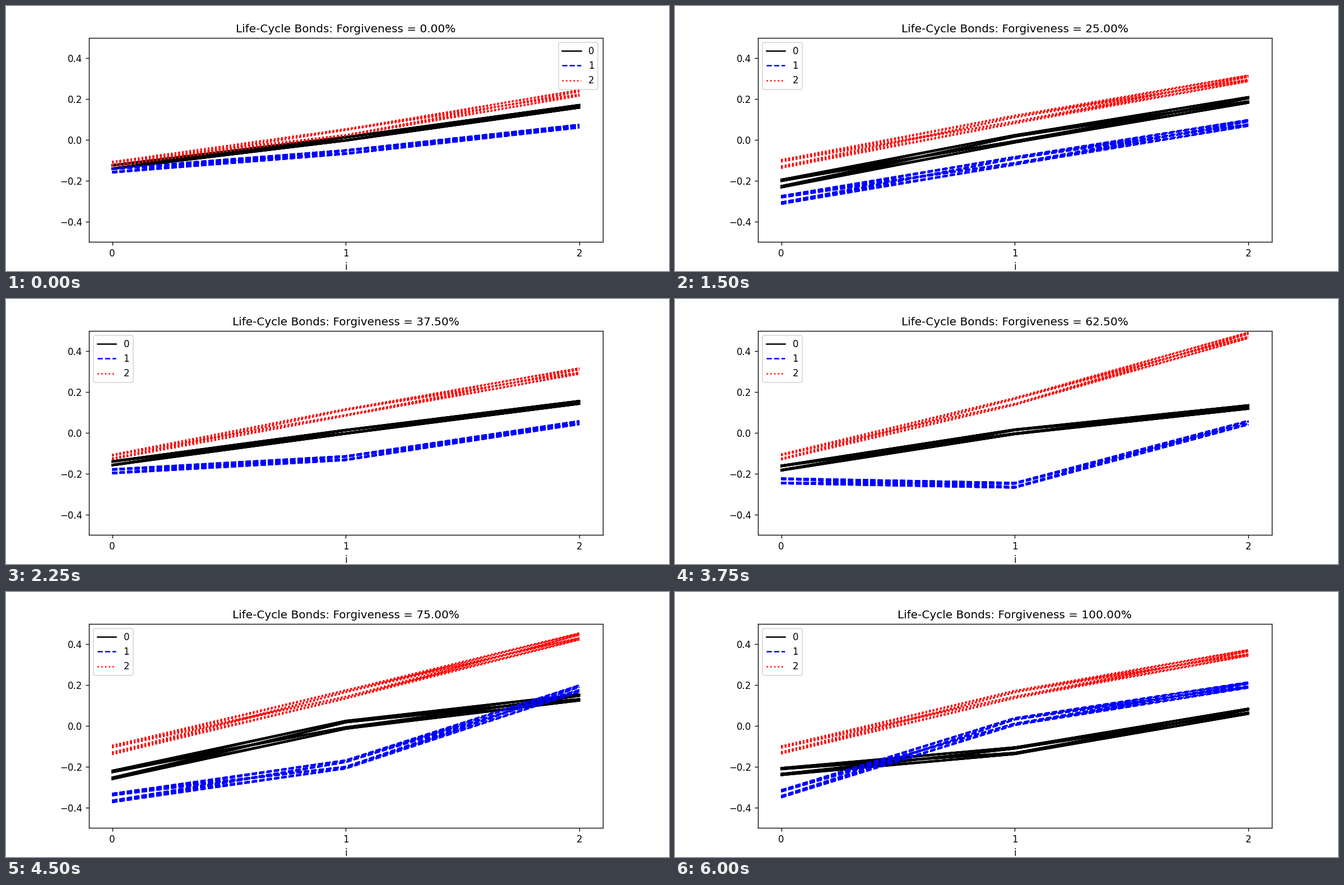
A matplotlib script for the animation above (6.75 s loop, 1183 px wide and 473 px high).

```python
from itertools import product

import numpy as np
import matplotlib.pyplot as plt
from matplotlib.animation import FuncAnimation

STEPS = 9
NODES = [0, 1, 2]
STYLES = ["k-", "b--", "r:"]
CARRY = 0.25  # share of a deviation that survives to the next node
SHOCKS = np.array(list(product((1, -1), repeat=5)))


def track(p, *points):
    """Linear path through (forgiveness, value) key points."""
    return np.interp(p, *zip(*points))


def volatility(p):
    return track(p, (0, 0.52), (0.125, 1.03), (0.25, 0.98), (0.375, 0.55),
                 (0.625, 0.65), (0.75, 1.05), (1, 0.9))


def black_center(p, vol):
    return (-0.05 - 0.16 * vol - 0.03 * p,
            track(p, (0.75, 0.005), (1, -0.122)),
            0.12 + 0.085 * vol - 0.125 * p ** 2)


def blue_center(p, vol):
    return (-0.01 - 0.27 * vol - 0.08 * p,
            track(p, (0, -0.06), (0.375, -0.124), (0.625, -0.257),
                  (0.75, -0.189), (1, 0.021)),
            track(p, (0, 0.067), (0.125, 0.116), (0.375, 0.05),
                  (0.625, 0.05), (0.75, 0.183), (1, 0.2)))


def red_center(p, vol):
    return (-0.118,
            track(p, (0, 0.036), (0.125, 0.1), (0.375, 0.1), (0.625, 0.154)),
            track(p, (0, 0.23), (0.125, 0.3), (0.375, 0.303),
                  (0.625, 0.478), (1, 0.358)))


def bundle(center, vol, late_vol):
    """All paths around a centre, one per history of up and down shocks."""
    sizes = [0.016 * vol] * 3 + [0.015 * late_vol, 0.011 * late_vol]
    dev = np.zeros(len(SHOCKS))
    history = []
    for size, sign in zip(sizes, SHOCKS.T):
        dev = CARRY * dev + size * sign
        history.append(dev)
    return np.array(history[-3:]) + np.array(center)[:, None]


# 1183 x 473 pixels; the tiny surplus guards against rounding down.
fig, ax = plt.subplots(figsize=(9.8584, 3.9417), dpi=120)


def draw(step):
    p = step / (STEPS - 1)
    vol = volatility(p)
    bundles = [bundle(black_center(p, vol), vol, vol),
               bundle(blue_center(p, vol), vol, vol),
               bundle(red_center(p, vol), vol, max(vol, 0.95))]
    ax.clear()
    handles = [ax.plot(NODES, paths, style)[0]
               for paths, style in zip(bundles, STYLES)]
    ax.set_xlim(-0.1, 2.1)
    ax.set_ylim(-0.5, 0.5)
    ax.set_xticks(NODES)
    ax.set_xlabel("i")
    ax.set_title(f"Life-Cycle Bonds: Forgiveness = {p:.2%}")
    ax.legend(handles, ["0", "1", "2"],
              loc="upper left" if step else "upper right")


anim = FuncAnimation(fig, draw, frames=STEPS, init_func=lambda: draw(0),
                     interval=750, repeat=True, repeat_delay=0)
plt.show()
```
